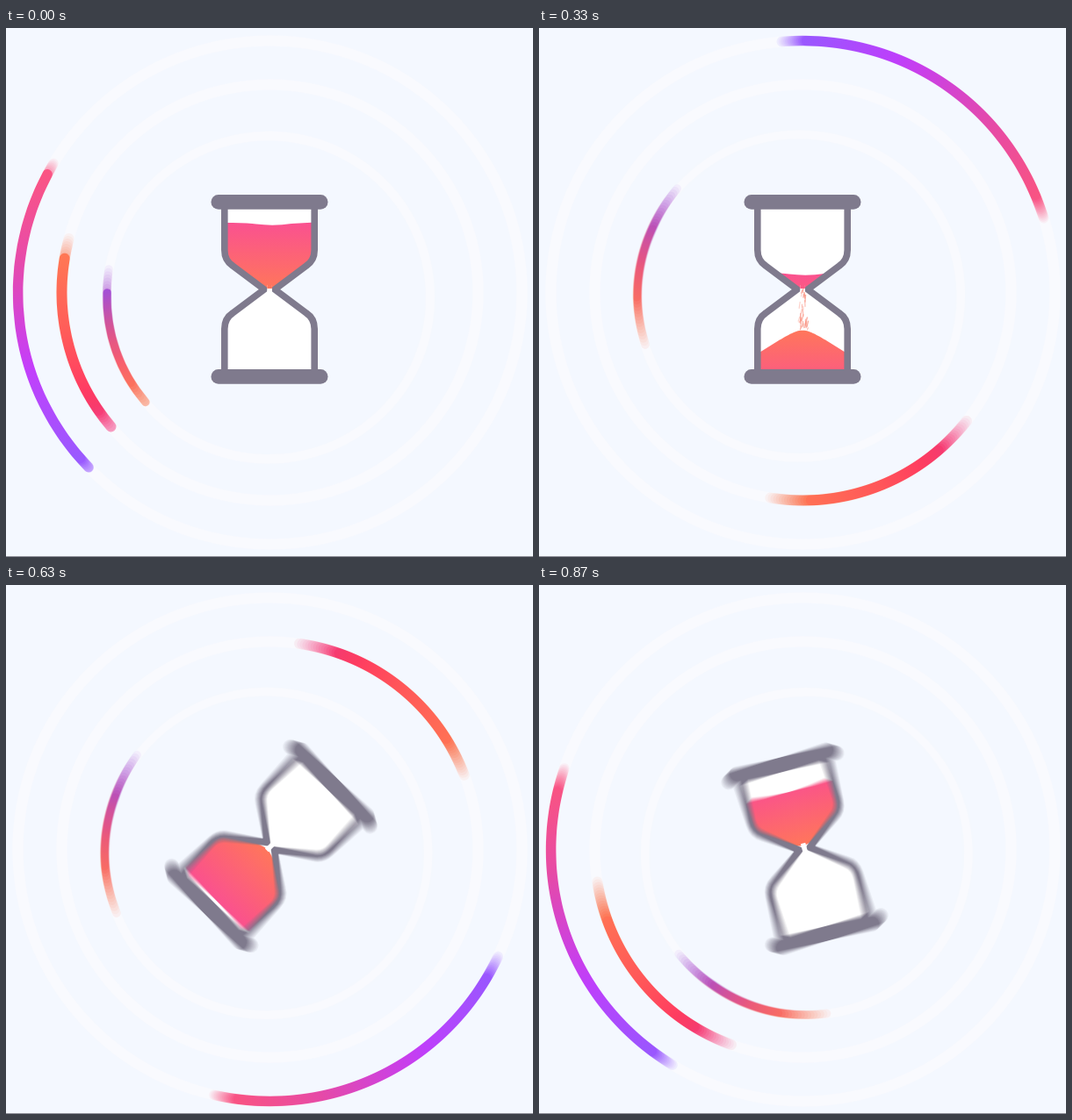
An HTML page with a canvas for the animation above (0.9 s loop, 600 by 603 pixels).

```html
<!DOCTYPE html>
<html lang="en">
<head>
<meta charset="utf-8">
<title>Hourglass loader</title>
<style>
  html, body { margin: 0; width: 100%; height: 100%; overflow: hidden; background: #f4f8ff; }
  canvas { display: block; }
</style>
</head>
<body>
<canvas id="stage" width="600" height="603"></canvas>
<script>
const LOOP = 900, STEP = 30, SHUTTER = 15, SAMPLES = 16;
const GRAY = '#7f7a8d', PINK = '#fa5190', CORAL = '#ff765b';
const W = 600, H = 603;

const stage = document.getElementById('stage').getContext('2d');
const scene = document.createElement('canvas');
scene.width = W;
scene.height = H;
const ctx = scene.getContext('2d');

// Angles in degrees, speed in degrees per ms; stops run from trailing to leading end.
const RINGS = [
  { x: 300.5, y: 301.5, r: 287, track: 12.5, width: 11.5, half: 36, start: 172, speed: 0.4, offset: 0,
    stops: [[0, '#9a5cff'], [0.36, '#c83ffb'], [0.72, '#ea4cab'], [1, '#fc5684']] },
  { x: 300.5, y: 301.5, r: 237, track: 12.5, width: 12, half: 24.8, start: 164.6, speed: 0.8, offset: 0,
    stops: [[0, '#f6458a'], [0.14, '#ff3a66'], [0.6, '#ff6459'], [1, '#ff7d55']] },
  { x: 300.8, y: 300.7, r: 184.2, track: 11, width: 9.5, half: 21, start: 160.7, speed: 1.186, offset: 6.8,
    stops: [[0, '#ff8058'], [0.4, '#f75c76'], [0.7, '#d2559f'], [1, '#a050e0']] }
];

const rad = deg => deg * Math.PI / 180;
const clamp = (v, lo, hi) => Math.min(hi, Math.max(lo, v));

function gradient(y0, y1, stops) {
  const g = ctx.createLinearGradient(0, y0, 0, y1);
  stops.forEach(([at, color]) => g.addColorStop(at, color));
  return g;
}

function randomFrom(seed) {
  return () => {
    seed = (seed * 1664525 + 1013904223) % 4294967296;
    return seed / 4294967296;
  };
}

function drawRing(ring, t) {
  const half = rad(ring.half), reach = ring.r * Math.sin(half);
  ctx.save();
  ctx.translate(ring.x, ring.y);
  ctx.rotate(rad(ring.start + ring.speed * t));
  ctx.translate(ring.offset * Math.cos(rad(-58.5)), ring.offset * Math.sin(rad(-58.5)));
  ctx.strokeStyle = '#f9fafe';
  ctx.lineWidth = ring.track;
  ctx.beginPath();
  ctx.arc(0, 0, ring.r, 0, Math.PI * 2);
  ctx.stroke();
  ctx.strokeStyle = gradient(-reach, reach, ring.stops);
  ctx.lineWidth = ring.width;
  ctx.lineCap = 'round';
  ctx.beginPath();
  ctx.arc(0, 0, ring.r, -half, half);
  ctx.stroke();
  ctx.restore();
}

function wall(side) {
  const x = d => 300 + side * d;
  return new Path2D(`M${x(51.2)} 206 V253 Q${x(51.2)} 265 ${x(42)} 271 L${x(6)} 298
    L${x(42)} 325 Q${x(51.2)} 331 ${x(51.2)} 343 V390`);
}

const WALLS = [wall(-1), wall(1)];
const INSIDE = new Path2D(`M248.8 206 V253 Q248.8 265 258 271 L294 298 L258 325 Q248.8 331 248.8 343 V390
  H351.2 V343 Q351.2 331 342 325 L306 298 L342 271 Q351.2 265 351.2 253 V206 Z`);

function drawTopSand(level) {
  ctx.fillStyle = gradient(level, level + 75, [[0, PINK], [1, CORAL]]);
  ctx.beginPath();
  ctx.moveTo(248, level);
  ctx.quadraticCurveTo(275, level - 0.5, 285, level + 1.5);
  ctx.quadraticCurveTo(305, level + 4, 325, level + 1);
  ctx.lineTo(352, level - 0.5);
  ctx.lineTo(352, 298);
  ctx.lineTo(248, 298);
  ctx.fill();
}

function drawBottomSand(t) {
  const peak = Math.max(302, 390 - 0.1375 * t);
  const gap = clamp((t - 615) * 0.156, 0, 21);
  const base = 389 - gap;
  ctx.fillStyle = gradient(peak, Math.max(base, peak + 74), [[0, CORAL], [1, PINK]]);
  ctx.beginPath();
  ctx.moveTo(248, base);
  for (let dx = -52; dx <= 52; dx += 2) {
    const y = peak + (Math.hypot(dx, 12) - 12) * 0.66;
    ctx.lineTo(300 + dx, Math.min(base, y));
  }
  ctx.lineTo(352, base);
  ctx.quadraticCurveTo(300, base - Math.min(6, gap), 248, base);
  ctx.fill();
}

// Falling grains: short slanted strokes, reshuffled at every step.
function drawStream(t) {
  if (t <= 0 || t > 470) return;
  const peak = 390 - 0.1375 * t;
  const fade = clamp((470 - t) / 60, 0, 1);
  const end = Math.min(297 + 0.57 * t, peak - 1, 297 + 80 * fade * fade + 8 * fade);
  const random = randomFrom(t * 7919 + 17);
  ctx.lineCap = 'round';
  ctx.strokeStyle = '#f9907f';
  ctx.lineWidth = 1.2;
  const count = Math.round((end - 297) * 0.75);
  for (let i = 0; i < count; i++) {
    const y = 297 + random() * (end - 297);
    const spread = 2.2 + 3.2 * clamp((y - 297) / 22, 0, 1) * fade;
    const x = 301.5 + (random() * 2 - 1) * spread;
    ctx.globalAlpha = 0.35 + 0.45 * random();
    ctx.beginPath();
    ctx.moveTo(x, y);
    ctx.lineTo(x - 2 + random() * 2.5, Math.min(end, y + 3 + random() * 5));
    ctx.stroke();
  }
  ctx.globalAlpha = 1;
}

function drawHourglass(t, angle) {
  const level = 222 + 0.173 * t;
  ctx.save();
  ctx.translate(301, 299.5);
  ctx.rotate(rad(angle));
  ctx.translate(-301, -299.5);

  ctx.fillStyle = '#fff';
  ctx.fill(INSIDE);
  ctx.save();
  ctx.clip(INSIDE);
  if (level < 297) drawTopSand(level);
  drawBottomSand(t);
  ctx.restore();

  ctx.strokeStyle = GRAY;
  ctx.lineWidth = 7.6;
  ctx.lineCap = 'butt';
  ctx.lineJoin = 'round';
  WALLS.forEach(path => ctx.stroke(path));
  ctx.fillStyle = '#fff';
  ctx.fillRect(297.3, 293, 5.6, 11.5);
  if (level < 297) {
    ctx.fillStyle = gradient(level, level + 75, [[0, PINK], [1, CORAL]]);
    ctx.fillRect(297.3, 292, 5.6, 5);
  }
  drawStream(t);

  ctx.fillStyle = GRAY;
  for (const y of [190, 389]) {
    ctx.beginPath();
    ctx.roundRect(233.5, y, 133, 16.7, 8.3);
    ctx.fill();
  }
  ctx.restore();
}

function drawScene(t, sub) {
  ctx.fillStyle = '#f4f8ff';
  ctx.fillRect(0, 0, W, H);
  RINGS.forEach(ring => drawRing(ring, sub));
  drawHourglass(t, Math.max(0, sub - 540) * 0.5);
  ctx.fillStyle = '#8c8c96';
  ctx.fillRect(0, 602, W, 1);
}

// Averages several moments within the shutter for motion blur.
function render(t) {
  for (let i = 0; i < SAMPLES; i++) {
    const sub = t + SHUTTER * ((i + 0.5) / SAMPLES - 0.5);
    drawScene(t, Math.max(0, sub));
    stage.globalAlpha = 1 / (i + 1);
    stage.drawImage(scene, 0, 0);
  }
}

let shown = -1;
const began = performance.now();

function tick() {
  const elapsed = (performance.now() - began) % LOOP;
  const t = Math.floor(elapsed / STEP) * STEP;
  if (t !== shown) {
    shown = t;
    render(t);
  }
  requestAnimationFrame(tick);
}
tick();
</script>
</body>
</html>
```
